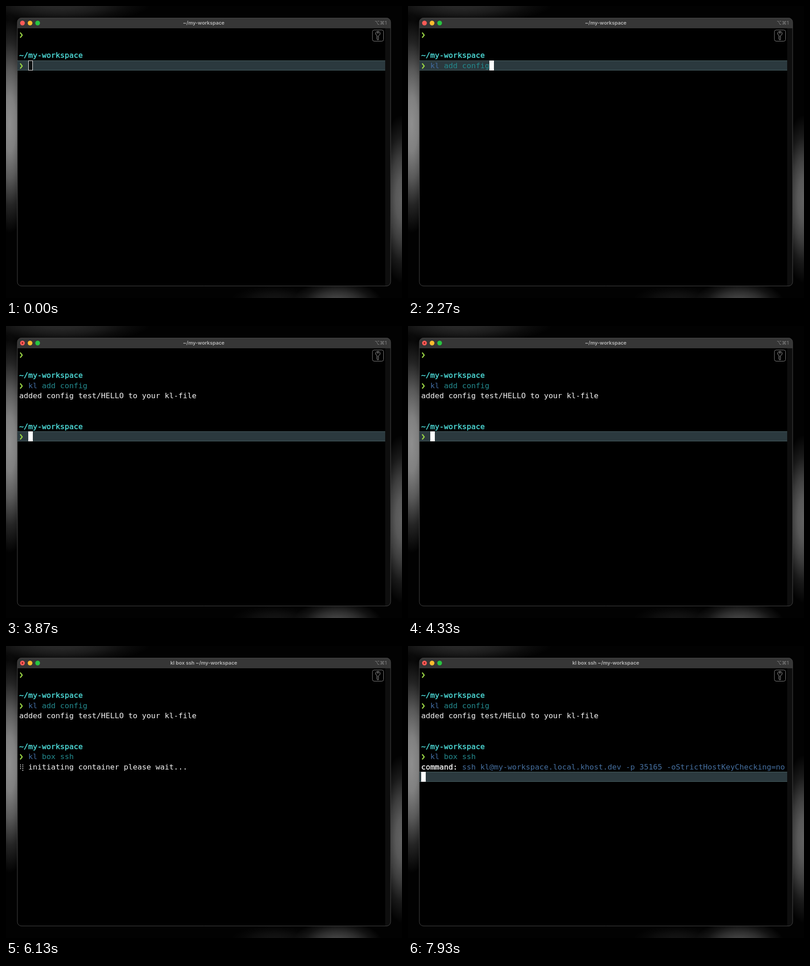
An HTML page with a canvas for the animation above (8000 ms loop, 871 by 643 pixels).

```html
<!DOCTYPE html>
<html lang="en">
<head>
<meta charset="utf-8">
<title>Terminal</title>
<style>
  html, body { margin: 0; width: 100%; height: 100%; overflow: hidden; background: #000; }
  canvas { display: block; }
</style>
</head>
<body>
<canvas id="stage" width="871" height="643"></canvas>
<script>
const LOOP = 8000;
const ctx = document.getElementById('stage').getContext('2d');

const COLS = 10, ROWS = 22.53, LEFT = 29, TOP = 52;
const MONO = '16.61px "DejaVu Sans Mono", monospace';
const C = {
  white: '#f4f4f4', gray: '#808080', path: '#4fdfdc', green: '#9ad545',
  cmd: '#416a9f', arg: '#23898d', url: '#456f9f', mark: '#2499ad'
};

// Moments, in ms, at which the session changes
const AT = {
  focus: 70, type1: 1000, run1: 2400, load: 2470, pick: 2930, added: 3870,
  type2: 4530, run2: 5400, spin: 5500, clear: 7470, ssh: 7730
};

const colX = c => LEFT + c * COLS;
const rowY = r => Math.round(TOP + r * ROWS);
const typed = (s, t, start, step) =>
  s.slice(0, Math.max(0, Math.min(s.length, Math.floor((t - start) / step) + 1)));

function text(s, col, row, color, bold) {
  const x = colX(col), y = rowY(row) + 17;
  ctx.font = MONO;
  ctx.textAlign = 'left';
  ctx.fillStyle = ctx.strokeStyle = color;
  ctx.fillText(s, x, y);
  if (bold) {
    ctx.lineWidth = 0.4;
    ctx.strokeText(s, x, y);
  }
}

function line(points, color, width) {
  ctx.beginPath();
  points.forEach(([x, y]) => ctx.lineTo(x, y));
  ctx.strokeStyle = color;
  ctx.lineWidth = width;
  ctx.stroke();
}

function disc(x, y, r, color) {
  ctx.beginPath();
  ctx.arc(x, y, r, 0, 7);
  ctx.fillStyle = color;
  ctx.fill();
}

function box(x, y, w, h, r) {
  ctx.beginPath();
  ctx.roundRect(x, y, w, h, r);
}

function glow(x, y, rx, ry, gray, alpha) {
  ctx.save();
  ctx.translate(x, y);
  ctx.scale(rx, ry);
  const g = ctx.createRadialGradient(0, 0, 0, 0, 0, 1);
  [1, 0.9, 0.62, 0.24, 0].forEach((a, i) =>
    g.addColorStop(i / 4, `rgba(${gray},${gray},${gray},${a * alpha})`));
  ctx.fillStyle = g;
  ctx.fillRect(-1, -1, 2, 2);
  ctx.restore();
}

function backdrop() {
  ctx.fillStyle = '#020202';
  ctx.fillRect(0, 0, 871, 643);
  glow(8, 260, 56, 240, 150, 0.95);
  glow(870, 425, 52, 185, 115, 0.85);
  glow(728, 655, 100, 52, 90, 0.8);
  glow(590, 648, 95, 34, 28, 0.7);
  glow(120, -6, 200, 46, 60, 0.7);
}

function keyIcon() {
  box(806, 52.8, 24.5, 24.7, 4);
  ctx.fillStyle = '#000';
  ctx.fill();
  ctx.strokeStyle = '#848484';
  ctx.lineWidth = 1;
  ctx.stroke();
  ctx.beginPath();
  ctx.arc(818, 60.6, 4.8, 2.05, 1.09 + Math.PI * 2);
  ctx.strokeStyle = '#b0b0b0';
  ctx.stroke();
  line([[816, 65], [816, 73], [818, 75], [819.8, 73], [818.6, 71.4],
    [819.8, 69.8], [818.6, 68], [819.8, 65]], '#b0b0b0', 1);
  ctx.beginPath();
  ctx.arc(818, 58.8, 1.2, 0, 7);
  ctx.stroke();
}

function frame(title, ran) {
  ctx.save();
  box(25, 26, 821, 591, 9);
  ctx.clip();
  ctx.fillStyle = '#000';
  ctx.fillRect(25, 26, 821, 591);
  ctx.fillStyle = '#0e0e0e';
  ctx.fillRect(834, 49, 12, 568);
  ctx.fillStyle = '#363636';
  ctx.fillRect(25, 26, 821, 23);
  ctx.restore();
  box(25, 26.5, 821, 590, 9);
  ctx.strokeStyle = '#484848';
  ctx.lineWidth = 1;
  ctx.stroke();

  ['#fc5b57', '#fdbb2e', '#28c540'].forEach((c, i) => disc(36.2 + i * 16.7, 37.5, 5.2, c));
  if (ran) disc(36.2, 37.5, 1.7, '#7d1512');

  ctx.textAlign = 'center';
  ctx.fillStyle = '#b9b9b9';
  ctx.font = '600 11px Inter, sans-serif';
  ctx.fillText(title, 435, 41);
  ctx.textAlign = 'right';
  ctx.fillStyle = '#858585';
  ctx.font = '11px Inter, "DejaVu Sans", sans-serif';
  ctx.fillText('⌥⌘1', 837.5, 40.5);
}

function chevron(row) {
  const y = rowY(row) + 12.2;
  line([[31.2, y - 5.6], [35.6, y], [31.2, y + 5.6]], C.green, 2.5);
}

function guide(row) {
  const y = rowY(row);
  ctx.fillStyle = '#2b393e';
  ctx.fillRect(25, y, 809, 22);
  ctx.fillStyle = '#4c6467';
  ctx.fillRect(25, y, 809, 1);
  ctx.fillRect(25, y + 21, 809, 1);
}

function cursor(col, row, hollow) {
  const x = colX(col), y = rowY(row);
  ctx.fillStyle = hollow ? '#0c0f10' : '#fff';
  ctx.fillRect(x, y, COLS, 22);
  if (!hollow) return;
  ctx.strokeStyle = '#fff';
  ctx.lineWidth = 1;
  ctx.strokeRect(x + 0.5, y + 0.5, COLS - 1, 21);
}

// Prompt with directory above; an active one has the row guide and cursor
function prompt(row, input, active, hollow) {
  text('~/my-workspace', 0, row - 1, C.path, true);
  if (active) guide(row);
  chevron(row);
  text(input.slice(0, 2), 2, row, C.cmd);
  text(input.slice(2), 4, row, C.arg);
  if (active) cursor(2 + input.length, row, hollow);
}

// Eight dots with one gap travelling round
function spinner(row, label, t) {
  const ring = [[0, 0], [1, 0], [1, 1], [1, 2], [1, 3], [0, 3], [0, 2], [0, 1]];
  const gap = Math.floor(t / 100) % 8;
  ctx.fillStyle = C.white;
  ring.forEach(([x, y], i) => {
    if (i !== gap) ctx.fillRect(31 + x * 5, rowY(row) + 6 + y * 4, 1.8, 1.8);
  });
  text(label, 2, row, C.white);
}

function picker(t) {
  text('Select Key of test >', 0, 0, C.white);
  cursor(20, 0);
  text('s', 20, 0, '#000');
  text('earch', 21, 0, C.gray);
  text('1/1', 0, 1, C.white);
  line([[69, 86], [830, 86]], '#e4e4e4', 1.3);
  text('>', 0, 2, C.mark);
  text('HELLO', 2, 2, C.white);
  spinner(24, 'loading please wait...', t);
}

function shell(t) {
  chevron(0);
  prompt(3, typed('kl add config', t, AT.type1, 90), t < AT.run1, t < AT.focus);
  if (t >= AT.load && t < AT.pick) spinner(4, 'loading please wait...', t);
  if (t < AT.added) return;

  text('added config test/HELLO to your kl-file', 0, 4, C.white);
  prompt(8, typed('kl box ssh', t, AT.type2, 80), t < AT.run2);
  if (t >= AT.spin && t < AT.clear) spinner(9, 'initiating container please wait...', t);
  if (t < AT.ssh) return;

  text('command:', 0, 9, C.white, true);
  text('ssh kl@my-workspace.local.khost.dev -p 35165 -oStrictHostKeyChecking=no', 9, 9, C.url);
  guide(10);
  cursor(0, 10);
}

function titleAt(t) {
  const job = t >= AT.run2 ? 'kl box ssh ' : t >= AT.run1 && t < AT.added ? 'kl add config ' : '';
  return job + '~/my-workspace';
}

function draw(t) {
  backdrop();
  frame(titleAt(t), t >= AT.run1);
  if (t >= AT.pick && t < AT.added) picker(t);
  else shell(t);
  keyIcon();
}

const start = performance.now();
function tick() {
  draw((performance.now() - start) % LOOP);
  requestAnimationFrame(tick);
}
tick();
</script>
</body>
</html>
```
